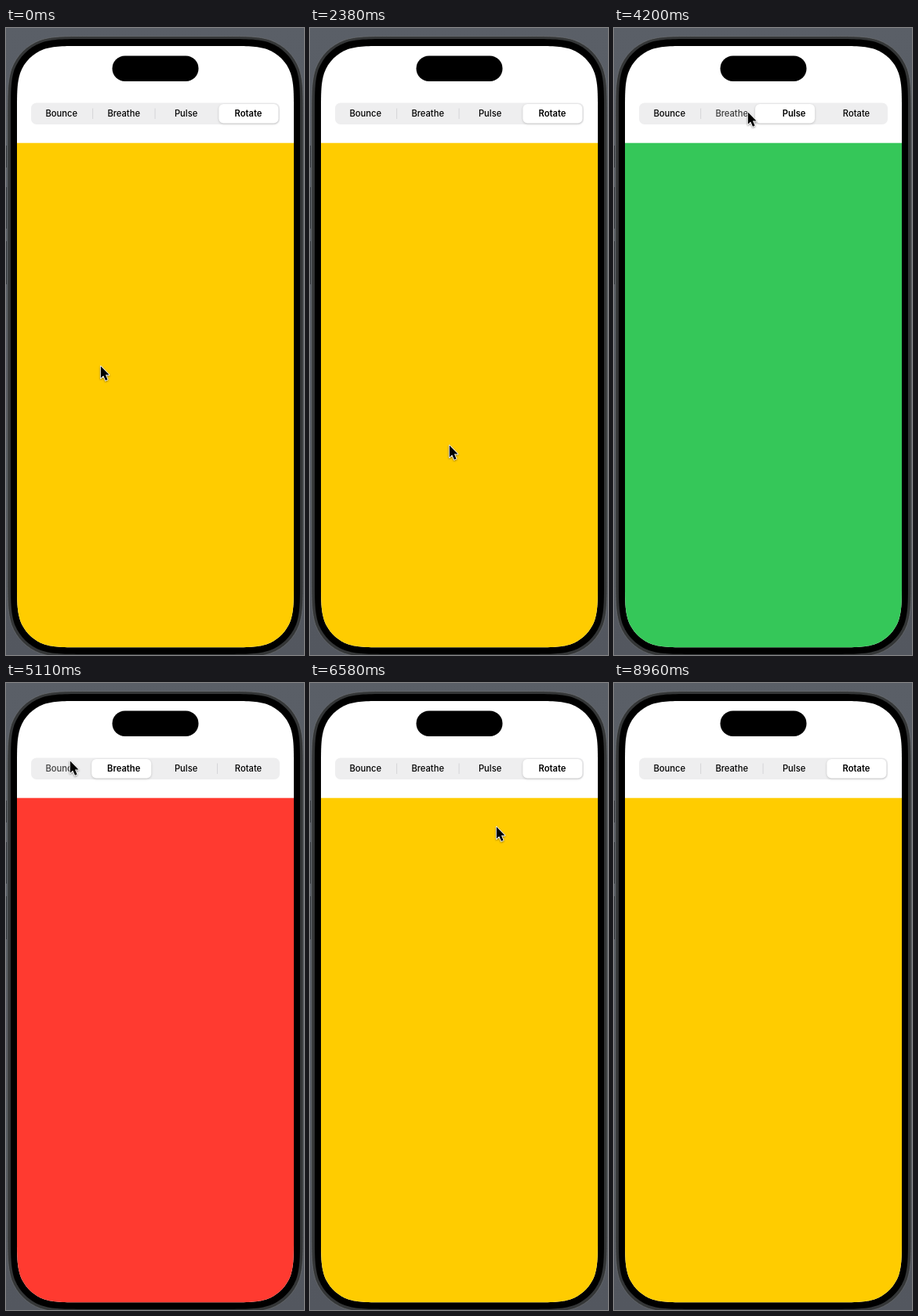
Write an HTML page that moves like this. It is 380 px wide and 800 px high and loops after 9.52 s.

```html
<!DOCTYPE html>
<html lang="en">
<head>
<meta charset="utf-8">
<title>Segmented control</title>
<style>
  html, body { margin: 0; width: 100%; height: 100%; overflow: hidden; background: #585d65; }
  svg { display: block; width: 380px; height: 800px; }
  text { font: 500 11.2px Inter, Roboto, sans-serif; text-anchor: middle; fill: #000; }
  text.on { font-weight: 600; }
  #thumb { filter: drop-shadow(0 1px 1.5px rgba(0, 0, 0, .18)); }
  #cursor { filter: drop-shadow(0 1px 1px rgba(0, 0, 0, .4)); }
</style>
</head>
<body>
<svg viewBox="0 0 380 800">
  <defs>
    <linearGradient id="desk" x2="0" y2="1">
      <stop stop-color="#5a5f67"/><stop offset="1" stop-color="#53575f"/>
    </linearGradient>
    <clipPath id="glass"><path id="screen"/></clipPath>
  </defs>
  <rect width="380" height="800" fill="url(#desk)"/>
  <path d="M.5 150v28m0 25v53m0 16v55" stroke="#303338"/>
  <path id="rim" fill="#343637" stroke="#6c6f72" stroke-width=".7"/>
  <path id="bezel"/>
  <g clip-path="url(#glass)">
    <rect x="14" y="23" width="353" height="768" fill="#fff"/>
    <rect id="panel" x="14" y="146.7" width="353" height="644"/>
  </g>
  <rect x="135.5" y="35.5" width="110" height="32.5" rx="16.25"/>
  <rect x="32" y="95.5" width="317" height="27.5" rx="7" fill="#eeeeef"/>
  <g id="lines" fill="#d2d2d5"></g>
  <rect id="thumb" y="97" width="76" height="24.5" rx="6" fill="#fff"/>
  <g id="labels"></g>
  <path id="cursor" d="M.8 1.5V16.8L4.2 13.6L7 19.8L9.6 18.6L6.9 12.6H11.5Z"
        stroke="#fff" stroke-width="1.7" stroke-linejoin="round" paint-order="stroke"/>
</svg>
<script>
const LOOP = 9520, STEP = 70, SEG = 79.4, REST = .4;
const segments = [
  { name: 'Bounce', color: '#ff3a30' }, { name: 'Breathe', color: '#35c759' },
  { name: 'Pulse', color: '#007aff' }, { name: 'Rotate', color: '#ffcc00' }
];
// Where the pointer has arrived by each time, and the segment it taps there
const stops = [
  { at: 0, x: 120, y: 430 },
  { at: 2240, x: 177, y: 531 },
  { at: 3353, x: 231, y: 106, tap: 2 },
  { at: 4162, x: 170, y: 106, tap: 1 },
  { at: 5092, x: 81, y: 98, tap: 0 },
  { at: 5985, x: 305, y: 107, tap: 3 },
  { at: 6580, x: 237, y: 182 },
  { at: 7210, x: 180, y: 400 },
  { at: 8400, x: 150, y: 815 }
];
const taps = stops.filter(s => 'tap' in s);

const $ = id => document.getElementById(id);
const clamp = v => Math.max(0, Math.min(1, v));
const smooth = v => v * v * (3 - 2 * v);
const mix = (a, b, e) => a + (b - a) * e;
const spring = ms => { const u = Math.max(0, ms) * .018; return 1 - (1 + u) * Math.exp(-u); };

function add(parent, tag, attrs) {
  const el = document.createElementNS('http://www.w3.org/2000/svg', tag);
  for (const key in attrs) el.setAttribute(key, attrs[key]);
  return $(parent).appendChild(el);
}

// Rounded rectangle with continuous-curvature corners
function squircle(left, top, right, bottom, r) {
  const half = [[1.529, 0], [1.088, 0], [.868, 0], [.631, .075], [.373, .169]];
  const corner = [...half, ...half.map(([a, b]) => [b, a]).reverse()];
  const place = (fx, fy, pts) => pts.map(([a, b]) => [
    fx ? right - a * r : left + a * r, fy ? bottom - b * r : top + b * r]);
  const back = [...corner].reverse();
  return [place(0, 0, back), place(1, 0, corner), place(1, 1, back), place(0, 1, corner)]
    .map(([first, ...rest], i) => `${i ? 'L' : 'M'}${first}C${rest.join(' ')}`).join('') + 'Z';
}
$('screen').setAttribute('d', squircle(14, 23, 367, 790.3, 54.5));
$('bezel').setAttribute('d', squircle(6, 14, 375, 799, 62));
$('rim').setAttribute('d', squircle(2, 10.5, 379, 803, 66));

const labels = segments.map(({ name }, i) => {
  const el = add('labels', 'text', { x: 70.8 + i * SEG, y: 113 });
  el.textContent = name;
  return el;
});
const lines = [0, 1, 2].map(i =>
  add('lines', 'rect', { x: 110.2 + i * SEG, y: 102.5, width: .9, height: 13.5 }));

// The pointer rests for part of each interval, then glides to the next stop
function pointer(t) {
  const next = stops.findIndex(s => s.at > t);
  if (next < 0) return stops.at(-1);
  const a = stops[next - 1], b = stops[next];
  const e = smooth(clamp(((t - a.at) / (b.at - a.at) - REST) / (1 - REST)));
  return { x: mix(a.x, b.x, e), y: mix(a.y, b.y, e) };
}

function draw(t) {
  let pos = 3, active = 3;
  const dim = segments.map(() => 0);
  for (const { at, tap } of taps) {
    const age = t - at;
    pos = mix(pos, tap, spring(age));
    if (age >= 0) active = tap;
    dim[tap] = clamp(1 - (age < 0 ? -age / 90 : age / 250));
  }
  $('panel').setAttribute('fill', segments[active].color);
  $('thumb').setAttribute('x', 33.2 + pos * SEG);
  labels.forEach((el, i) => {
    el.classList.toggle('on', Math.abs(pos - i) < .35);
    el.setAttribute('opacity', 1 - .3 * dim[i]);
  });
  lines.forEach((el, i) =>
    el.setAttribute('opacity', clamp((Math.abs(pos - i - .5) - .7) / .3)));
  const { x, y } = pointer(t);
  $('cursor').setAttribute('transform', `translate(${x} ${y})`);
}

const start = performance.now();
function tick() {
  const t = (performance.now() - start) % LOOP;
  draw(Math.floor(t / STEP) * STEP);
  requestAnimationFrame(tick);
}
tick();
</script>
</body>
</html>
```
